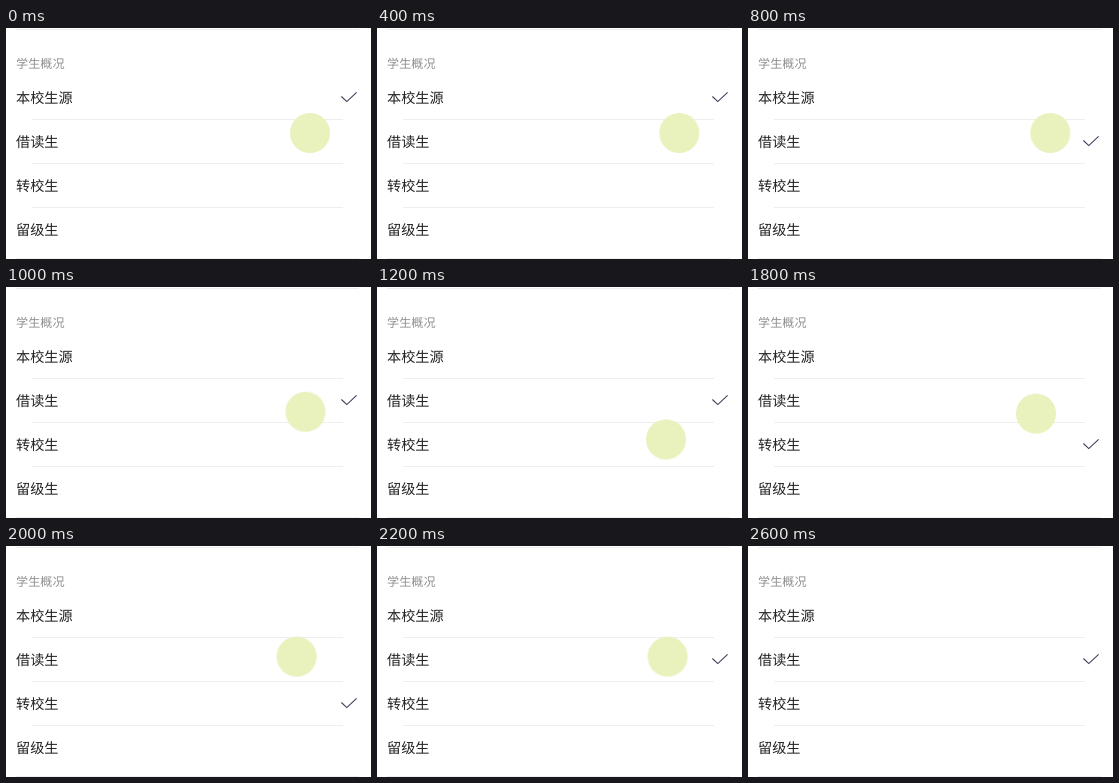
Recreate the animation shown at these times as an HTML page. Size 365 px wide and 231 px high, loop 3.4 s.

```html
<!DOCTYPE html>
<html lang="zh-CN">
<head>
<meta charset="utf-8">
<title>学生概况</title>
<style>
  html, body { margin: 0; width: 100%; height: 100%; overflow: hidden; background: #fff; }
  svg { display: block; width: 365px; height: 231px; }
  text {
    font: 14.15px "Noto Sans CJK SC", "Noto Sans CJK", sans-serif;
    fill: #222;
    text-rendering: geometricPrecision;
  }
  .title { font-size: 12.1px; fill: #8f8f8f; }
  .rules { fill: #eee; }
  .check { fill: none; stroke: #3c3c58; stroke-width: 1.1; animation: pick 3.4s step-end infinite; }
  .touch { fill: #e9f1bc; animation: move 3.4s step-end infinite; }

  @keyframes pick {
    0%      { transform: translateY(0); }
    23.529% { transform: translateY(44px); }
    47.058% { transform: translateY(88px); }
    64.705% { transform: translateY(44px); }
    100%    { transform: translateY(44px); }
  }
  @keyframes move {
    0%      { transform: translate(304px, 105px); opacity: 1; }
    11.764% { transform: translate(302.3px, 105px); }
    29.411% { transform: translate(299.5px, 124.7px); }
    35.294% { transform: translate(289px, 152.4px); }
    41.176% { transform: translate(288px, 155.5px); }
    52.941% { transform: translate(288px, 126.6px); }
    58.823% { transform: translate(290.6px, 110.6px); opacity: 1; }
    76.47%  { transform: translate(290.6px, 110.6px); opacity: 0; }
    100%    { transform: translate(290.6px, 110.6px); opacity: 0; }
  }
</style>
</head>
<body>
<svg viewBox="0 0 365 231">
  <g class="rules">
    <rect x="10" y="1" width="343" height="1"/>
    <rect x="26" y="91" width="311" height="1"/>
    <rect x="26" y="135" width="311" height="1"/>
    <rect x="26" y="179" width="311" height="1"/>
    <rect x="10" y="230" width="343" height="1"/>
  </g>
  <text class="title" x="10.1" y="40.4">学生概况</text>
  <text x="10.1" y="74.5">本校生源</text>
  <text x="10.1" y="118.5">借读生</text>
  <text x="10.1" y="162.5">转校生</text>
  <text x="10.1" y="206.5">留级生</text>
  <path class="check" d="M335.4 68.5L340.8 73.6L350.6 64.4"/>
  <circle class="touch" r="20"/>
</svg>
</body>
</html>
```
